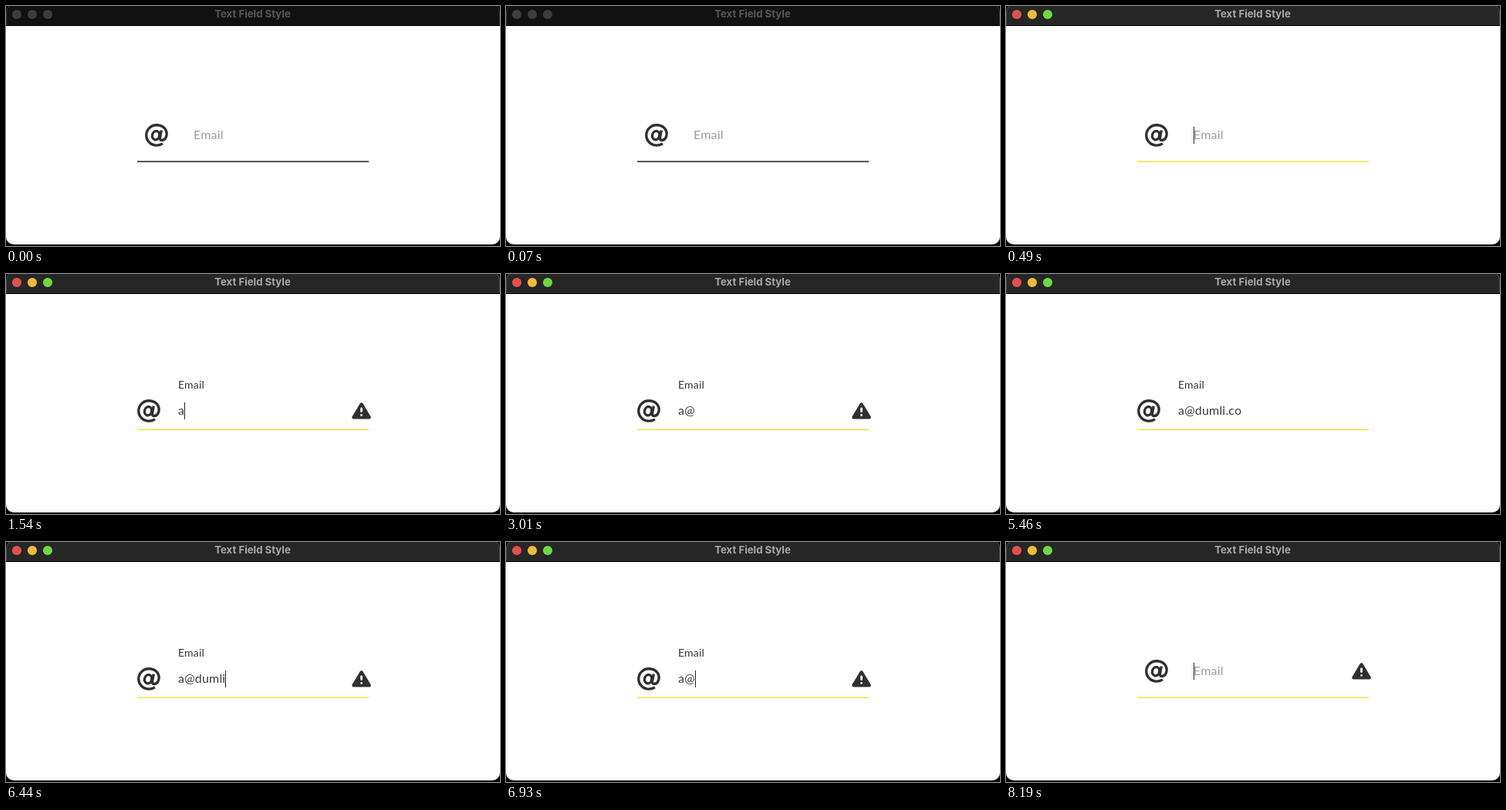
An HTML page that plays this animation: 640 by 312 pixels, repeating every 8.33 s.

```html
<!DOCTYPE html>
<html lang="en">
<head>
<meta charset="utf-8">
<title>Text Field Style</title>
<style>
  html, body { margin: 0; width: 100%; height: 100%; overflow: hidden; background: #000; }
  svg { display: block; width: 640px; height: 312px; }
  .bar { fill: #111; stroke: #3a3a3a; }
  .lights { fill: #3d3d3d; }
  .title { font: 700 13.2px Inter, sans-serif; fill: #575757; text-anchor: middle; }
  .line { fill: #333; }
  .field { font: 16px Lato, sans-serif; letter-spacing: .2px; fill: #3a3a3a; }
  .hint { fill: #979c9e; }
  .label { font: 14px Lato, sans-serif; letter-spacing: .2px; fill: #333; }
  .active .bar { fill: #262626; stroke: #505050; }
  .active .title { fill: #a9a9a9; }
  .active .line { fill: #f4e352; }
  .active .red { fill: #e0524e; }
  .active .amber { fill: #eebb3c; }
  .active .green { fill: #70d845; }
</style>
</head>
<body>
<svg id="stage" viewBox="0 0 640 312">
  <rect width="640" height="312"/>
  <rect class="bar" x=".5" y="-2.5" width="639" height="50" rx="10"/>
  <path d="M0 25H640V300H0Z"/>
  <path fill="#fff" d="M0 26H640V300a10 10 0 0 1-10 10H10a10 10 0 0 1-10-10Z"/>
  <g class="lights">
    <circle class="red" cx="14" cy="11" r="6.1"/>
    <circle class="amber" cx="34" cy="11" r="6.1"/>
    <circle class="green" cx="54" cy="11" r="6.1"/>
  </g>
  <text class="title" x="319.5" y="15">Text Field Style</text>

  <g id="at" fill="none" stroke="#303030" stroke-width="56">
    <g transform="scale(.0605)">
      <path d="M388 436C350 460 305 474 256 474A218 218 0 0 1 256 38C382 38 474 118 474 232C474 320 420 363 372 363C328 363 324 335 334 290L360 150"/>
      <ellipse cx="242" cy="260" rx="76" ry="94" transform="rotate(14 242 260)"/>
    </g>
  </g>
  <text class="label" id="label" x="223" y="149">Email</text>
  <text class="field hint" id="hint" x="243" y="173">Email</text>
  <text class="field" id="value" x="223" y="183"></text>
  <rect id="caret" width="1" height="22" fill="#222"/>
  <g id="warn">
    <path fill="#303030" stroke="#303030" stroke-width="4.4" stroke-linejoin="round" d="M460.5 169.5L470.6 186.3H450.4Z"/>
    <path stroke="#fff" stroke-width="2.8" stroke-linecap="round" d="M460.5 174.8V178.6M460.5 183.4V183.5"/>
  </g>
  <rect class="line" x="170" y="201.4" width="300" height="1.7"/>
</svg>
<script>
  const LOOP = 8330, FOCUS = 490, FIRST_KEY = 1540;
  const CARET_ON = 560, CARET_OFF = 500;
  const ADDRESS = 'a@dumli.co';
  const VALID = /^\S+@\S+\.\w{2,}$/;

  // Bursts of evenly spaced key presses; a shorter result means backspace
  const bursts = [
    { at: FIRST_KEY, every: 910, from: 0, to: 2 },
    { at: 3080, every: 158, from: 2, to: 7 },
    { at: 4380, every: 225, from: 7, to: 10 },
    { at: 5600, every: 280, from: 10, to: 8 },
    { at: 6440, every: 90, from: 8, to: 0 }
  ];

  const el = id => document.getElementById(id);
  const [stage, at, label, hint, value, caret, warn] =
    ['stage', 'at', 'label', 'hint', 'value', 'caret', 'warn'].map(el);
  const show = (node, on) => node.setAttribute('visibility', on ? 'visible' : 'hidden');
  const move = (node, x, y) => node.setAttribute('transform', `translate(${x} ${y})`);

  // Characters present and the moment of the latest key press
  function typing(t) {
    const burst = bursts.findLast(b => t >= b.at);
    if (!burst) return { count: 0, last: FOCUS };
    const { at, every, from, to } = burst;
    const presses = Math.min(Math.floor((t - at) / every) + 1, Math.abs(to - from));
    return { count: from + Math.sign(to - from) * presses, last: at + (presses - 1) * every };
  }

  function draw(t) {
    const { count, last } = typing(t);
    const text = ADDRESS.slice(0, count);
    const filled = count > 0;
    const active = t >= FOCUS;

    stage.classList.toggle('active', active);
    if (value.textContent !== text) value.textContent = text;
    show(label, filled);
    show(hint, !filled);
    show(warn, t >= FIRST_KEY && !VALID.test(text));
    show(caret, active && (t - last) % (CARET_ON + CARET_OFF) < CARET_ON);

    move(at, filled ? 169.5 : 179.5, filled ? 162.5 : 152.5);
    move(warn, 0, filled ? 0 : -10);
    const end = filled ? Math.round(223 + value.getComputedTextLength()) : 243;
    move(caret, end, filled ? 167 : 157);
  }

  const begin = performance.now();
  function tick() {
    draw((performance.now() - begin) % LOOP);
    requestAnimationFrame(tick);
  }
  tick();
</script>
</body>
</html>
```
